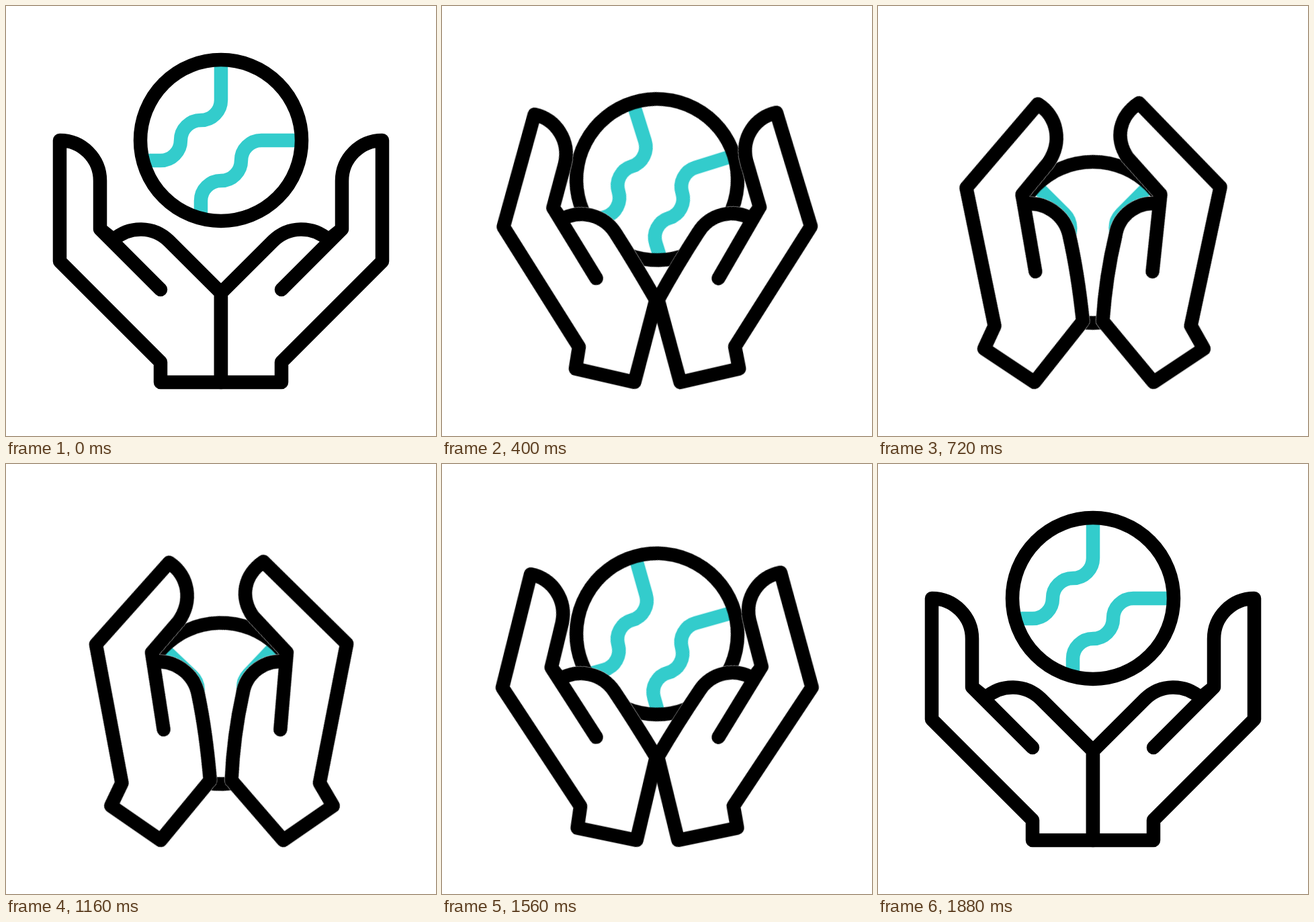
Recreate the animation shown at these times as an HTML page. Size 640 by 640 pixels, loop 2 s.

```html
<!DOCTYPE html>
<html lang="en">
<head>
<meta charset="utf-8">
<title>Hands around a globe</title>
<style>
  html, body { margin: 0; width: 100%; height: 100%; overflow: hidden; background: #fff; }
  svg { display: block; width: 100vw; height: 100vh; }

  .ball, .hand { animation: 2s cubic-bezier(.3333, 0, .6667, 1) infinite; }
  .ball { animation-name: move; --pose: translateY(158px) rotate(-47deg); }
  .hand {
    animation-name: move, morph;
    --rest: path("M0 0 L-90 0 L-90 -30 L-240 -180 L-240 -360 C-207 -360 -180 -333 -180 -300 L-180 -228 L-160 -212 A60 60 0 0 1 -77.6 -210.4 Q-38.8 -171.6 0 -133 Z M-180 -228 L-90 -138");
    d: var(--rest);
    fill: #fff;
    stroke: #000;
  }
  .left {
    --pose: translateX(-90.7px) rotate(35deg);
    --cupped: path("M0 0 L-90 0 L-96 -37.3 L-245 -185 L-224.5 -347.2 C-188.5 -347.2 -163 -320 -163 -283 L-169.6 -222.2 L-160 -212 A60 60 0 0 1 -77.6 -210.4 Q-36 -171 10 -115 Z M-169.6 -222.2 L-90 -138");
  }
  .right {
    --pose: translateX(-93.7px) rotate(35deg);
    --cupped: path("M0 0 L-90 0 L-93 -39.6 L-244 -187 L-211 -358 C-176 -358 -152 -335 -152 -300 L-163 -227 L-154 -216 A56 56 0 0 1 -74 -213.5 Q-28 -171 13 -117 Z M-163 -227 L-90 -138");
  }
  /* Thin light seam where a hand covers the globe */
  .seam { stroke: #fff; stroke-width: 21; }

  @keyframes move {
    from, 6%, 92.1%, to { transform: none; }
    40.1%, 55.9% { transform: var(--pose); }
  }
  @keyframes morph {
    from, 6%, 92.1%, to { d: var(--rest); }
    40.1%, 55.9% { d: var(--cupped); }
  }
</style>
</head>
<body>
<svg viewBox="0 0 640 640" fill="none" stroke-width="20.5" stroke-linejoin="round" stroke-linecap="round">
  <g transform="translate(320 200)">
    <g class="ball" stroke-linecap="butt">
      <g stroke="#3cc">
        <path d="M0 -120 V-60 A30 30 0 0 1 -30 -30 A30 30 0 0 0 -60 0 A30 30 0 0 1 -90 30 H-114"/>
        <path d="M120 0 H60 A30 30 0 0 0 30 30 A30 30 0 0 1 0 60 A30 30 0 0 0 -30 90 V114"/>
      </g>
      <circle r="120" stroke="#000"/>
    </g>
  </g>
  <g transform="translate(320 560)"><path class="hand left seam"/></g>
  <g transform="translate(320 560) scale(-1 1)"><path class="hand right seam"/></g>
  <g transform="translate(320 560)"><path class="hand left"/></g>
  <g transform="translate(320 560) scale(-1 1)"><path class="hand right"/></g>
</svg>
</body>
</html>
```
